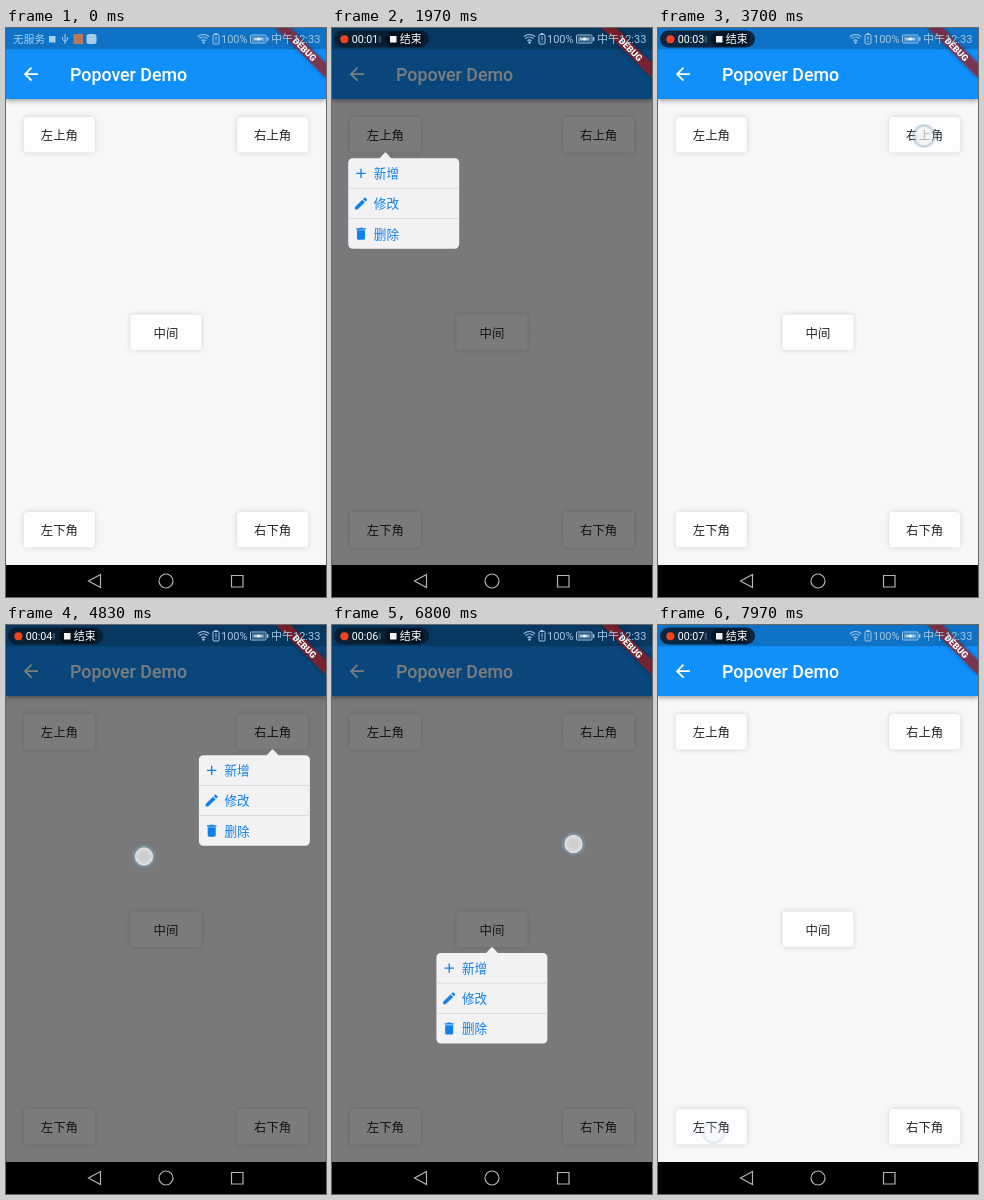
An HTML page with a canvas that plays this animation: 320 by 569 pixels, repeating every 8000 ms.

```html
<!DOCTYPE html>
<html lang="zh">
<head>
<meta charset="utf-8">
<title>Popover Demo</title>
<style>
  html, body { margin: 0; width: 100%; height: 100%; overflow: hidden; background: #000; }
  canvas { display: block; width: 320px; height: 569px; }
</style>
</head>
<body>
<canvas id="stage"></canvas>
<script>
const W = 320, H = 569, LOOP = 8000;
const DP = W / 360;
const FONT = 'Roboto, "Noto Sans CJK SC", "Noto Sans CJK", sans-serif';
const canvas = document.getElementById('stage');
const c = canvas.getContext('2d');
const ratio = window.devicePixelRatio || 1;
canvas.width = W * ratio;
canvas.height = H * ratio;

const BUTTONS = [
  ['左上角', 17.8, 88.9], ['右上角', 231.1, 88.9], ['中间', 124.4, 286.5],
  ['左下角', 17.8, 484], ['右下角', 231.1, 484]
];
const BTN_W = 80 * DP, BTN_H = 40 * DP;

// tip position, left edge of the panel, opening and closing start
const POPOVERS = [
  { x: 53.4, y: 124.4, left: 16.2, open: 790, close: 2843 },
  { x: 266.6, y: 124.4, left: 192.9, open: 3820, close: 4870 },
  { x: 160, y: 322.2, left: 104.4, open: 5860, close: 6883 }
];
const POP_MS = 300;

// x, y, press time, release time
const TOUCHES = [
  [53.5, 103, 400, 740], [203, 182, 2630, 2830],
  [266, 108, 3430, 3780], [138, 231.5, 4570, 4860],
  [175.5, 300, 5470, 5820], [241.5, 219, 6670, 6880],
  [55.5, 507.5, 7600, 7740]
];

const ICONS = {
  back: 'M20 11H7.83l5.59-5.59L12 4l-8 8 8 8 1.41-1.41L7.83 13H20z',
  add: 'M19 13h-6v6h-2v-6H5v-2h6V5h2v6h6z',
  edit: 'M3 17.25V21h3.75L17.81 9.94l-3.75-3.75zM20.71 7.04a1 1 0 0 0 0-1.41l-2.34-2.34a1 1 0 0 0-1.41 0l-1.83 1.83 3.75 3.75z',
  trash: 'M6 19c0 1.1.9 2 2 2h8c1.1 0 2-.9 2-2V7H6zM19 4h-3.500l-1-1h-5l-1 1H5v2h14z'
};
for (const k in ICONS) ICONS[k] = new Path2D(ICONS[k]);
const ITEMS = [['add', '新增'], ['edit', '修改'], ['trash', '删除']];

const clamp = v => Math.max(0, Math.min(1, v));

// cubic-bezier(.25, .1, .25, 1)
function ease(p) {
  let lo = 0, hi = 1, s = p;
  const bez = (a, b) => 3 * a * s * (1 - s) ** 2 + 3 * b * s * s * (1 - s) + s ** 3;
  for (let i = 0; i < 16; i++) {
    s = (lo + hi) / 2;
    if (bez(.25, .25) < p) lo = s; else hi = s;
  }
  return bez(.1, 1);
}

function rect(x, y, w, h, color) {
  c.fillStyle = color;
  c.fillRect(x, y, w, h);
}

function round(x, y, w, h, r, color) {
  c.beginPath();
  c.roundRect(x, y, w, h, r);
  c.fillStyle = color;
  c.fill();
}

function disc(x, y, r, color) {
  c.beginPath();
  c.arc(x, y, r, 0, 7);
  c.fillStyle = color;
  c.fill();
}

function text(str, x, y, size, color, weight = 400, align = 'left') {
  c.font = `${weight} ${size}px ${FONT}`;
  c.textAlign = align;
  c.fillStyle = color;
  c.fillText(str, x, y);
}

function icon(name, x, y, size, color) {
  c.save();
  c.translate(x - size / 2, y - size / 2);
  c.scale(size / 24, size / 24);
  c.fillStyle = color;
  c.fill(ICONS[name]);
  c.restore();
}

function shadow(color, blur, dy = 0) {
  c.shadowColor = color;
  c.shadowBlur = blur * ratio;
  c.shadowOffsetY = dy * ratio;
}

function page() {
  rect(0, 0, W, 537, '#f7f6f9');
  c.save();
  shadow('rgba(0,0,0,.4)', 5, 1.5);
  rect(0, 0, W, 71, '#1190fb');
  c.restore();
  rect(0, 0, W, 21.3, '#0e73c6');
  icon('back', 24.9, 46.2, 21.3, '#fff');
  text('Popover Demo', 64, 52.7, 17.8, '#fff', 500);
  for (const [label, x, y] of BUTTONS) {
    c.save();
    shadow('rgba(0,0,0,.16)', 5);
    round(x, y, BTN_W, BTN_H, 3.5, '#fdfcfe');
    c.restore();
    text(label, x + BTN_W / 2, y + 23.2, 12.4, '#262628', 400, 'center');
  }
}

function popover(p, v) {
  const top = p.y + 5.8, w = 111, row = 30.2;
  rect(0, 0, W, 537, `rgba(0,0,0,${.51 * ease(v)})`);
  c.save();
  c.globalAlpha = v;
  c.translate(p.x, p.y);
  c.scale(v, v);
  c.translate(-p.x, -p.y);
  c.beginPath();
  c.roundRect(p.left, top, w, row * 3, 4.5);
  c.moveTo(p.x - 5.8, top);
  c.lineTo(p.x - .8, p.y + .4);
  c.quadraticCurveTo(p.x, p.y, p.x + .8, p.y + .4);
  c.lineTo(p.x + 5.8, top);
  c.fillStyle = '#f2f1f4';
  c.fill();
  ITEMS.forEach(([name, label], i) => {
    const y = top + row * (i + .5);
    icon(name, p.left + 12.8, y, 16, '#1080ec');
    text(label, p.left + 25.6, y + 4.9, 12.6, '#1080ec');
    if (i) rect(p.left, top + row * i - .4, w, .8, '#d8d7da');
  });
  c.restore();
}

function banner() {
  c.save();
  c.translate(W, 0);
  c.rotate(Math.PI / 4);
  c.save();
  shadow('rgba(0,0,0,.5)', 5);
  rect(-40 * DP, 28 * DP, 80 * DP, 12 * DP, 'rgba(183,28,28,.63)');
  c.restore();
  text('DEBUG', 0, 33.5, 9.1, '#fff', 900, 'center');
  c.restore();
}

function line(color, width, draw) {
  c.beginPath();
  draw();
  c.strokeStyle = color;
  c.lineWidth = width;
  c.stroke();
}

function notices() {
  const ink = '#a9cdec';
  text('无服务', 7, 15, 10.7, ink);
  rect(43, 8, 6.5, 6.5, ink);
  line(ink, 1, () => {
    c.moveTo(59, 6); c.lineTo(59, 16);
    c.moveTo(56.500, 9); c.lineTo(56.500, 11.5); c.lineTo(59, 13.5);
    c.lineTo(61.5, 11.5); c.lineTo(61.5, 9);
  });
  rect(67.5, 6, 9.5, 10, '#b9785c');
  round(80.5, 6, 10, 10, 2.5, '#a9cdec');
}

function status() {
  const ink = '#a3c6e2';
  for (const r of [3, 6, 8.5]) {
    line(ink, 1.2, () => c.arc(197.5, 15, r, -2.3, -.84));
  }
  disc(197.5, 14.5, 1.2, ink);
  line(ink, 1, () => c.roundRect(207, 6.5, 6, 9.500, 1));
  rect(208.7, 5, 2.6, 1.5, ink);
  rect(209.5, 8.2, 1, 3.6, ink);
  rect(209.5, 12.8, 1, 1.2, ink);
  text('100%', 215, 15.1, 11, ink);
  line(ink, 1, () => c.roundRect(244.500, 7, 15.5, 8, 1));
  rect(246, 8.5, 12.5, 5, 'rgba(163,198,226,.55)');
  rect(261, 9.2, 1.4, 3.6, ink);
  line('#e8f3fb', 1.2, () => { c.moveTo(248, 11); c.lineTo(256.500, 11); });
  disc(252.500, 11, 1.6, '#e8f3fb');
  text('中午12:33', 265, 15.1, 11, ink);
}

function recorder(t) {
  c.save();
  c.globalAlpha = t < 130 ? .75 : 1;
  round(2, 2.5, 95, 17, 8.5, 'rgba(10,28,46,.88)');
  round(53, 3.5, 39, 15, 7.5, 'rgba(0,8,18,.55)');
  rect(46.5, 8, 2.5, 6.5, 'rgba(150,175,195,.3)');
  disc(12.4, 11.2, 4, '#f8421c');
  const sec = Math.max(0, Math.floor((t - 31) / 1000));
  text('00:0' + sec, 19.7, 15, 10.7, '#fff');
  rect(58, 8, 6.5, 6.5, '#f4f4f4');
  text('结束', 67.7, 15, 11, '#fff');
  c.restore();
}

function navBar() {
  rect(0, 537, W, 32, '#000');
  const ink = '#b4b4b4';
  line(ink, 1.2, () => {
    c.moveTo(94.5, 546.5); c.lineTo(94.5, 559.5); c.lineTo(82.500, 553); c.closePath();
  });
  line(ink, 1.2, () => c.arc(160, 553, 7, 0, 7));
  line(ink, 1.2, () => c.rect(225.500, 547.5, 11.5, 11.5));
}

function touch([x, y, down, up], t) {
  const a = Math.min(clamp((t - down + 20) / 60), clamp(1 - (t - up) / 380));
  if (t < down || a <= 0) return;
  c.save();
  c.globalAlpha = a;
  line('rgba(125,165,190,.42)', 2.8, () => c.arc(x, y, 10.4, 0, 7));
  const g = c.createRadialGradient(x, y, 4, x, y, 9.2);
  g.addColorStop(0, 'rgba(240,240,243,.72)');
  g.addColorStop(1, 'rgba(244,244,247,.84)');
  disc(x, y, 9.2, g);
  c.restore();
}

function draw(t) {
  c.setTransform(ratio, 0, 0, ratio, 0, 0);
  page();
  for (const p of POPOVERS) {
    const v = Math.min(clamp((t - p.open) / POP_MS), clamp(1 - (t - p.close) / POP_MS));
    if (v > 0) popover(p, v);
  }
  banner();
  if (t < 30) notices();
  status();
  navBar();
  if (t >= 30) recorder(t);
  for (const p of TOUCHES) touch(p, t);
}

const start = performance.now();
function tick() {
  draw((performance.now() - start) % LOOP);
  requestAnimationFrame(tick);
}
tick();
</script>
</body>
</html>
```
